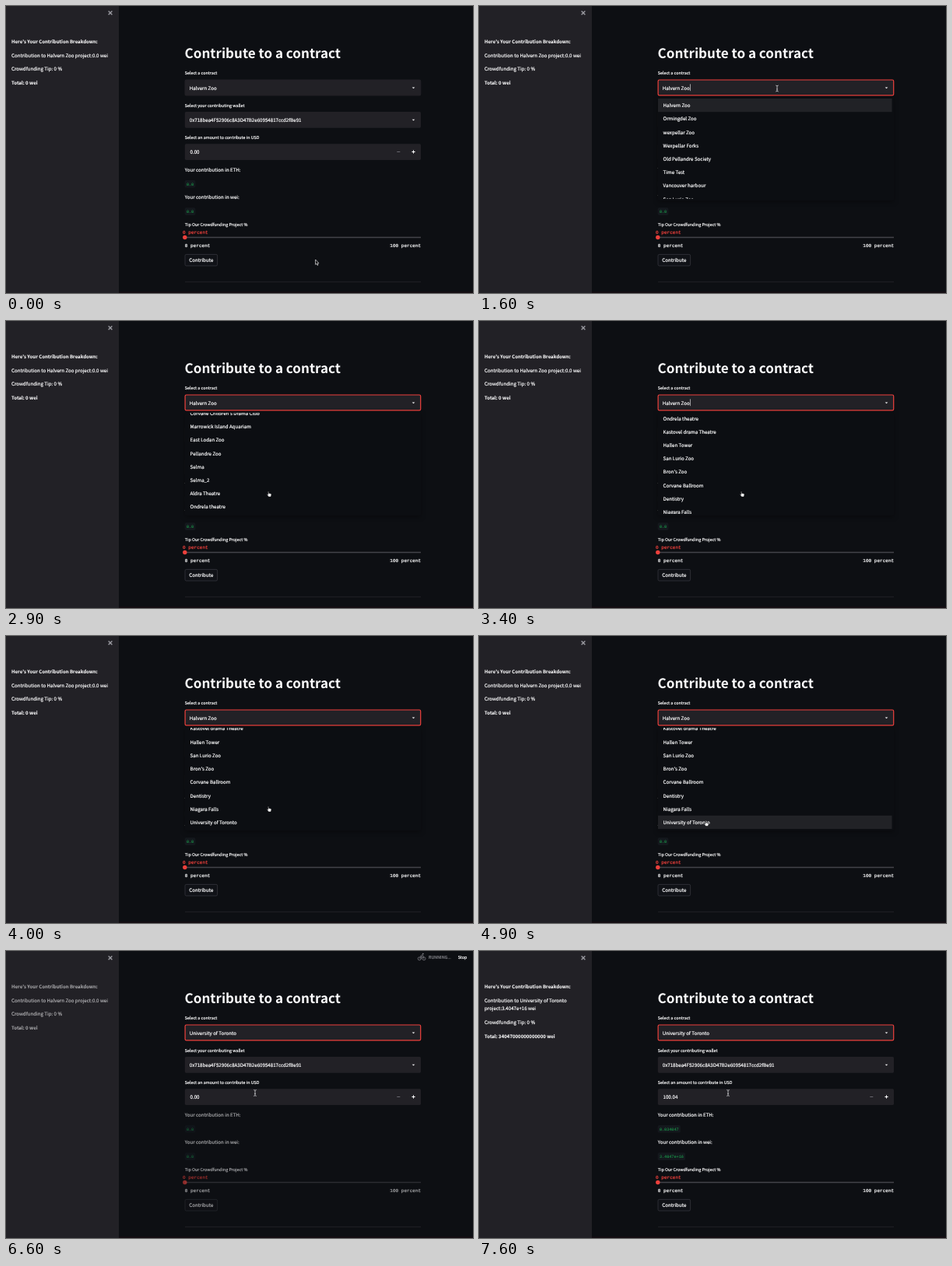
Animation of 600x369 px, one loop 8000 ms. Source, as an HTML page with a canvas:

```html
<!DOCTYPE html>
<html lang="en">
<head>
<meta charset="utf-8">
<title>Contribute to a contract</title>
<style>
html, body { margin: 0; width: 100%; height: 100%; overflow: hidden; background: #0d0f13; }
canvas { display: block; width: 600px; height: 369px; }
</style>
</head>
<body>
<canvas id="stage"></canvas>
<script>
const W = 600, H = 369, LOOP = 8000, STEP = 100;
const SANS = '"Noto Sans CJK JP", "Noto Sans CJK SC", "Noto Sans CJK", sans-serif';
const MONO = '"Liberation Mono", "DejaVu Sans Mono", monospace';
const BG = '#0d0f13', PANEL = '#222126', INK = '#fcfcfd', RED = '#ee403c', GREEN = '#1b9449';
const BODY = 6.17, SMALL = 5.39, ROW = 17.22;
const OPEN = 1500, PICK = 5100, RERUN = 7000, SIDE = 7200, DONE = 7400;
const WALLET = '0x718bea4F52906c8A3D47B2e60954817ccd2fBe91';
const ITEMS = [
  'Halvern Zoo', 'Ormingdel Zoo', 'wexpellar Zoo', 'Wexpellar Forks', 'Old Pellandre Society',
  'Time Test', 'Vancouver harbour', 'San Lurio Zoo', "Corvane Children's Drama Club",
  'Marrowick Island Aquariam', 'East Lodan Zoo', 'Pellandre Zoo', 'Selma', 'Selma_2',
  'Aldra Theatre', 'Ondrela theatre', 'Kastovel drama Theatre', 'Hallen Tower',
  'San Lurio Zoo', "Bron's Zoo", 'Corvane Ballroom', 'Dentistry', 'Niagara Falls',
  'University of Toronto'
];
const LAST = ITEMS.length - 1;

// Each key: time, then values
const SCROLL = [[2500, 0], [2600, 22], [2700, 66], [2800, 109], [2900, 147], [3100, 207],
  [3250, 238], [3400, 260.8], [3700, 277], [4000, 284.2]];
const POINTER = [[200, 398, 329], [300, 384, 140.5], [500, 384, 140.5], [1000, 383, 106],
  [2100, 383, 106], [2400, 338, 222], [4100, 338, 222], [4900, 292, 240.5],
  [5900, 292, 240.5], [6400, 320, 182.5]];

const canvas = document.getElementById('stage');
const ctx = canvas.getContext('2d');
const ratio = window.devicePixelRatio || 1;
canvas.width = W * ratio;
canvas.height = H * ratio;

function at(keys, t) {
  if (t <= keys[0][0]) return keys[0].slice(1);
  for (let i = 1; i < keys.length; i++) {
    const a = keys[i - 1], b = keys[i];
    if (t <= b[0]) {
      const k = (t - a[0]) / (b[0] - a[0]);
      return a.slice(1).map((v, j) => v + (b[j + 1] - v) * k);
    }
  }
  return keys[keys.length - 1].slice(1);
}

// The hairline outline keeps small type bright
function text(str, x, y, { size = BODY, color = INK, weight = 400, family = SANS, align = 'left', edge = 0.2 } = {}) {
  ctx.font = `${weight} ${size}px ${family}`;
  ctx.fillStyle = ctx.strokeStyle = color;
  ctx.textAlign = align;
  ctx.fillText(str, x, y);
  if (edge) {
    ctx.lineWidth = edge;
    ctx.lineJoin = 'round';
    ctx.strokeText(str, x, y);
  }
}

function box(x, y, w, h, fill, stroke, line = 1, r = 1.7) {
  ctx.beginPath();
  ctx.roundRect(x, y, w, h, r);
  if (fill) { ctx.fillStyle = fill; ctx.fill(); }
  if (stroke) { ctx.strokeStyle = stroke; ctx.lineWidth = line; ctx.stroke(); }
}

function poly(points, fill, stroke, line = 1, close = true) {
  ctx.beginPath();
  points.forEach(([x, y], i) => i ? ctx.lineTo(x, y) : ctx.moveTo(x, y));
  if (close) ctx.closePath();
  if (fill) { ctx.fillStyle = fill; ctx.fill(); }
  if (stroke) { ctx.strokeStyle = stroke; ctx.lineWidth = line; ctx.stroke(); }
}

const seg = (x1, y1, x2, y2, color, line) => poly([[x1, y1], [x2, y2]], null, color, line, false);

function dot(x, y, r, fill, stroke, line) {
  ctx.beginPath();
  ctx.arc(x, y, r, 0, Math.PI * 2);
  if (fill) { ctx.fillStyle = fill; ctx.fill(); }
  if (stroke) { ctx.strokeStyle = stroke; ctx.lineWidth = line; ctx.stroke(); }
}

function chip(str, y) {
  ctx.font = `5.17px ${MONO}`;
  box(229.7, y - 4.8, ctx.measureText(str).width + 4.4, 9.6, '#14181d');
  text(str, 231.9, y + 1.9, { size: 5.17, color: GREEN, family: MONO, edge: 0.1 });
}

function arrowDown(y) {
  poly([[521.7, y - 0.6], [525.3, y - 0.6], [523.5, y + 1.2]], INK);
}

function sidebar(t, fade) {
  ctx.fillStyle = PANEL;
  ctx.fillRect(0, 0, 145, H);
  seg(131.6, 6.4, 136.4, 11.2, '#9a9aa1', 1.4);
  seg(136.4, 6.4, 131.6, 11.2, '#9a9aa1', 1.4);
  const done = t >= SIDE;
  const bold = { weight: 700, size: 6.05, edge: 0.1 };
  ctx.globalAlpha = done ? 1 : fade;
  text("Here's Your Contribution Breakdown:", 7, 47.8, bold);
  if (done) {
    text('Contribution to University of Toronto', 7, 65.6);
    text('project:3.4047e+16 wei', 7, 76.2);
  } else {
    text(`Contribution to ${ITEMS[0]} project:0.0 wei`, 7, 65.6);
  }
  const drop = done ? 10.7 : 0;
  text('Crowdfunding Tip: 0 %', 7, 83.3 + drop);
  text(done ? 'Total: 34047000000000000 wei' : 'Total: 0 wei', 7, 101 + drop, bold);
  ctx.globalAlpha = 1;
}

function form(t, fade) {
  const done = t >= RERUN;
  const label = { size: SMALL };
  text('Contribute to a contract', 229.6, 67.1, { size: 17.05, weight: 700, edge: 0 });

  text('Select a contract', 229.7, 88.2, label);
  box(230.1, 95, 302.6, 19.9, PANEL, t >= OPEN ? RED : PANEL, 1.2);
  const value = ITEMS[t >= PICK ? LAST : 0];
  text(value, 235.8, 107.6);
  const caret = t >= PICK ? (t - PICK) % 1000 < 500
    : t >= OPEN && (t + 600) % 1000 < 500;
  if (caret) {
    const x = 236.6 + ctx.measureText(value).width;
    seg(x, 100.4, x, 109.2, INK, 0.6);
  }
  arrowDown(105);

  text('Select your contributing wallet', 229.7, 129.6, label);
  box(229.8, 136, 303.2, 20.7, PANEL);
  text(WALLET, 235.8, 148.8);
  arrowDown(146.4);

  text('Select an amount to contribute in USD', 229.7, 171.1, label);
  box(229.8, 177.3, 303.2, 20.7, PANEL);
  text(done ? '100.04' : '0.00', 236.5, 190);
  seg(502.3, 187.5, 506.3, 187.5, '#7c7c83', 0.8);
  seg(521.4, 187.5, 525.6, 187.5, INK, 1.1);
  seg(523.5, 185.4, 523.5, 189.6, INK, 1.1);

  ctx.globalAlpha = fade;
  text('Your contribution in ETH:', 229.7, 212.7);
  chip(done ? '0.034047' : '0.0', 228.8);
  text('Your contribution in wei:', 229.7, 248);
  chip(done ? '3.4047e+16' : '0.0', 264.1);

  const mono = { size: 6.05, family: MONO };
  text('Tip Our Crowdfunding Project %', 229.7, 283, label);
  text('0 percent', 227, 292.8, { ...mono, color: RED });
  seg(229.8, 297.5, 533, 297.5, '#43434a', 1.7);
  dot(229.8, 297.5, 2.7, RED);
  text('0 percent', 229.8, 309.6, mono);
  text('100 percent', 533.2, 309.6, { ...mono, align: 'right' });

  box(230, 319.4, 41.6, 14.6, '#101217', '#3b3c43', 0.7);
  text('Contribute', 250.8, 328.9, { align: 'center' });
  ctx.globalAlpha = 1;
  seg(230, 354.8, 533, 354.8, '#27282e', 0.8);
}

function menu(t) {
  if (t < OPEN || t >= PICK) return;
  const [scroll] = at(SCROLL, t);
  const [, py] = at(POINTER, t);
  const hover = t < 2200 ? 0
    : t < 2600 ? Math.max(0, Math.floor((py - 118.9) / ROW))
    : t >= 4200 ? Math.min(LAST, Math.floor((py - 118.9 + scroll) / ROW)) : -1;
  ctx.save();
  ctx.shadowColor = 'rgba(0,0,0,0.35)';
  ctx.shadowBlur = 6 * ratio;
  ctx.shadowOffsetY = 1.7 * ratio;
  box(230, 117, 303, 133, '#0c0e12');
  ctx.restore();
  ctx.save();
  ctx.beginPath();
  ctx.rect(230, 118, 303, 130);
  ctx.clip();
  ITEMS.forEach((name, i) => {
    const y = 127.6 + i * ROW - scroll;
    if (y < 105 || y > 262) return;
    if (i === hover) {
      ctx.fillStyle = '#212226';
      ctx.fillRect(230, y - ROW / 2, 300.5, ROW);
    }
    text(name, 236.6, y + 2.5);
  });
  ctx.restore();
}

function status(t) {
  if (t < 5300 || t >= DONE) return;
  const grey = '#85858b';
  const a = t / 100 * 0.8;
  const px = Math.cos(a) * 0.8, py = Math.sin(a) * 0.8;
  dot(531.2, 9.8, 2, null, grey, 0.7);
  dot(537, 9.8, 2, null, grey, 0.7);
  poly([[531.2, 9.8], [533, 7.2], [536, 7], [537, 9.8]], null, grey, 0.7, false);
  poly([[536.4, 6.4], [534.8, 4.8], [532.6, 6.6], [534.2, 8], [533.8 + px, 10 + py]], null, grey, 0.8, false);
  dot(535.8, 3.6, 0.9, grey);
  text('RUNNING...', 543, 10.1, { size: SMALL, color: grey });
  text('Stop', 580.8, 10.2, { size: SMALL });
}

function pointer(t) {
  const [x, y] = at(POINTER, t);
  const kind = t < 300 ? 'arrow' : t < 2300 ? 'beam' : t < 6000 ? 'hand' : t < 6300 ? 'arrow' : 'beam';
  ctx.save();
  ctx.translate(x, y);
  ctx.lineJoin = 'round';
  if (kind === 'arrow') {
    poly([[-0.4, -3], [-0.4, 3.4], [1, 2.2], [2, 4.4], [3, 3.9], [2.1, 1.8], [3.9, 1.7]], '#08080a', '#e8e8ea', 0.7);
  } else if (kind === 'beam') {
    poly([[-1.8, -4], [0, -3.3], [1.8, -4]], null, '#c4c4c8', 0.8, false);
    poly([[-1.8, 4], [0, 3.3], [1.8, 4]], null, '#c4c4c8', 0.8, false);
    seg(0, -3.3, 0, 3.3, '#c4c4c8', 0.9);
    seg(-1, 1, 1, 1, '#c4c4c8', 0.7);
  } else {
    poly([[-1.5, -3.1], [-0.5, -3.1], [-0.3, -0.6], [2.5, 0], [3.1, 0.9], [2.4, 4.1],
      [-0.7, 4.1], [-2.9, 1], [-2.2, 0.4], [-1.3, 1.2]], '#f4f4f5', '#08080a', 0.6);
  }
  ctx.restore();
}

function draw(t) {
  ctx.setTransform(ratio, 0, 0, ratio, 0, 0);
  ctx.textRendering = 'geometricPrecision';
  ctx.fillStyle = BG;
  ctx.fillRect(0, 0, W, H);
  // Stale widgets dim slowly while the page waits
  const k = Math.min(1, Math.max(0, (t - 5800) / 1000));
  const stale = 1 - 0.67 * k * k;
  sidebar(t, stale);
  form(t, t >= RERUN ? 1 : stale);
  menu(t);
  status(t);
  ctx.fillStyle = '#130d12';
  ctx.fillRect(145, 367, W - 145, 2);
  pointer(t);
}

function tick(now) {
  draw(Math.floor(now % LOOP / STEP) * STEP);
  requestAnimationFrame(tick);
}
requestAnimationFrame(tick);
</script>
</body>
</html>
```
